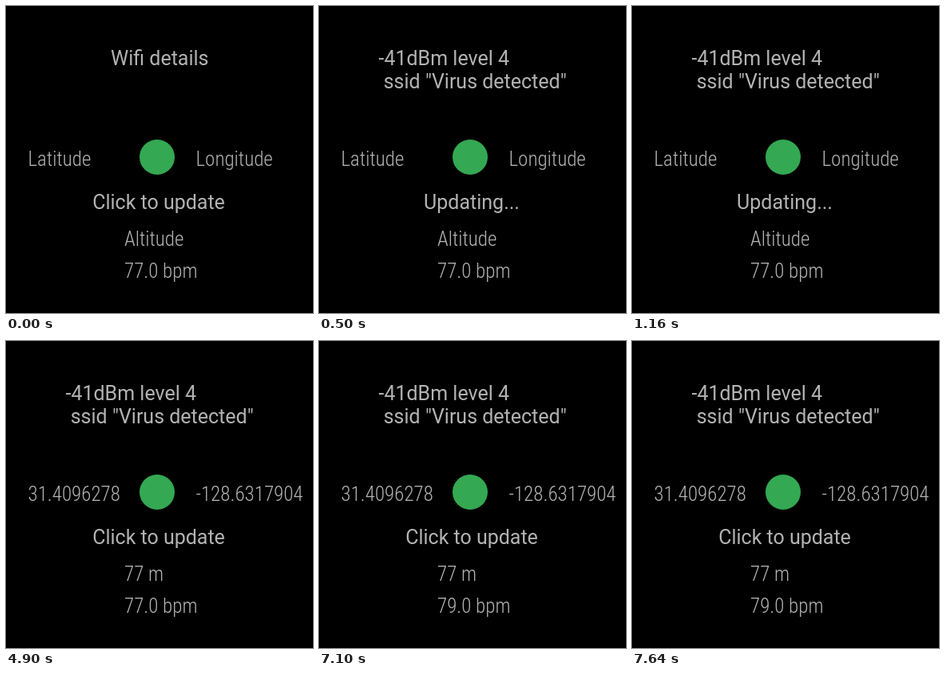
An HTML page for the animation above (8 s loop, 384 px wide and 384 px high).

```html
<!DOCTYPE html>
<html lang="en">
<head>
<meta charset="utf-8">
<title>Watch location panel</title>
<style>
  html, body { margin: 0; width: 100%; height: 100%; overflow: hidden; background: #000; }
  svg { display: block; width: 100%; height: 100%; --squeeze: 1; }
  text {
    font: 400 25px Roboto, sans-serif;
    fill: #b3b3b3;
    transform: translate(var(--x), var(--y));
  }
  .mid { text-anchor: middle; }
  .thin {
    font-family: "Roboto Condensed", Roboto, sans-serif;
    font-weight: 300;
    font-stretch: 75%;
    transform: translate(var(--x), var(--y)) scaleX(var(--squeeze));
  }

  .idle, .scanned, .ready, .updating, .unknown, .located, .pulse-a, .pulse-b {
    animation: 8s step-end infinite;
  }
  .idle     { animation-name: idle; }
  .scanned  { animation-name: scanned; }
  .ready    { animation-name: ready; }
  .updating { animation-name: updating; }
  .unknown  { animation-name: unknown; }
  .located  { animation-name: located; }
  .pulse-a  { animation-name: pulse-a; }
  .pulse-b  { animation-name: pulse-b; }

  @keyframes idle     { 0% { visibility: visible } 6.25%, 100% { visibility: hidden } }
  @keyframes scanned  { 0% { visibility: hidden } 6.25%, 100% { visibility: visible } }
  @keyframes ready    { 0% { visibility: visible } 6.25% { visibility: hidden } 20%, 100% { visibility: visible } }
  @keyframes updating { 0% { visibility: hidden } 6.25% { visibility: visible } 20%, 100% { visibility: hidden } }
  @keyframes unknown  { 0% { visibility: visible } 20%, 100% { visibility: hidden } }
  @keyframes located  { 0% { visibility: hidden } 20%, 100% { visibility: visible } }
  @keyframes pulse-a  { 0% { visibility: visible } 88.75%, 100% { visibility: hidden } }
  @keyframes pulse-b  { 0% { visibility: hidden } 88.75%, 100% { visibility: visible } }
</style>
</head>
<body>
<svg viewBox="0 0 384 384">
  <circle cx="189" cy="189" r="22" fill="#34a853"/>

  <text class="idle" style="--x:131px; --y:74px">Wifi details</text>
  <g class="scanned">
    <text style="--x:74.5px; --y:74px">-41dBm level 4</text>
    <text style="--x:80.7px; --y:103px">ssid "Virus detected"</text>
  </g>

  <text class="mid ready" style="--x:191px; --y:254px">Click to update</text>
  <text class="mid updating" style="--x:191px; --y:254px">Updating...</text>

  <g class="unknown">
    <text class="thin" style="--x:27.5px; --y:200px">Latitude</text>
    <text class="thin" style="--x:237.5px; --y:200px">Longitude</text>
    <text class="thin" style="--x:148px; --y:300px">Altitude</text>
  </g>
  <g class="located">
    <text class="thin" style="--x:27.5px; --y:200px">31.4096278</text>
    <text class="thin" id="longitude" style="--x:237.5px; --y:200px">-128.6317904</text>
    <text class="thin" style="--x:148px; --y:300px">77 m</text>
  </g>

  <text class="thin pulse-a" style="--x:148px; --y:340px">77.0 bpm</text>
  <text class="thin pulse-b" style="--x:148px; --y:340px">79.0 bpm</text>
</svg>
<script>
  // Condense the light text only where no condensed face is installed.
  const longitude = document.getElementById('longitude');
  if (longitude.getComputedTextLength() > 141) {
    document.querySelector('svg').style.setProperty('--squeeze', 0.88);
  }
</script>
</body>
</html>
```
